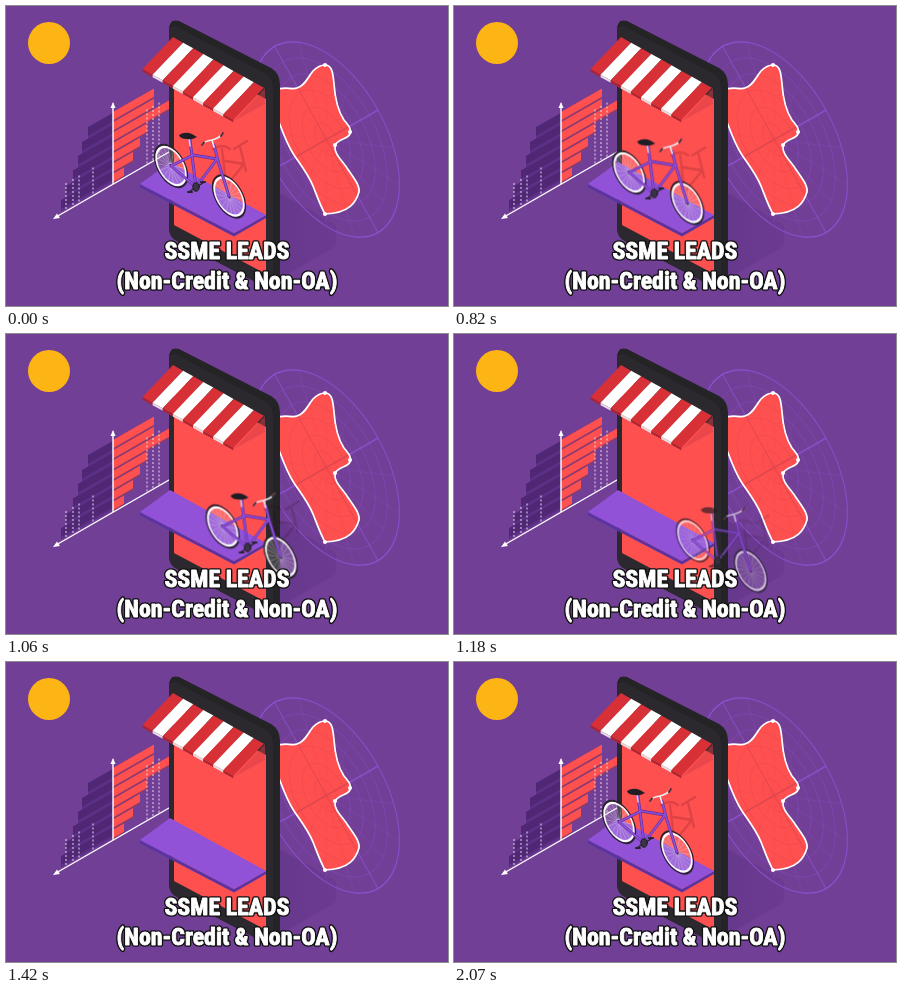
An HTML page for the animation above (4.9 s loop, 442 by 300 pixels).

```html
<!DOCTYPE html>
<html lang="en">
<head>
<meta charset="utf-8">
<title>SSME LEADS</title>
<style>
html, body { margin: 0; width: 100%; height: 100%; overflow: hidden; background: #723f97; }
svg { display: block; width: 100vw; height: 100vh; }
.line { fill: none; stroke-linecap: round; stroke-linejoin: round; }
.caption {
  font-family: "Roboto Condensed", "Open Sans Condensed", "Noto Sans", sans-serif;
  font-size: 25px; font-weight: 900; font-stretch: extra-condensed;
  text-anchor: middle; stroke-linejoin: round;
}
#ride { animation: ride 4900ms linear infinite; }
#bike { animation: fade 4900ms linear infinite; }
@keyframes ride {
  0% { transform: translate(0, 0); }
  13.673% { transform: translate(0, 0); animation-timing-function: cubic-bezier(.333, 0, .667, 1); }
  28.98%, 33% { transform: translate(97px, 61px); }
  33.01%, 100% { transform: translate(0, 0); }
}
@keyframes fade {
  0% { opacity: 1; }
  22.245% { opacity: 1; animation-timing-function: steps(12, start); }
  29.592% { opacity: 0; }
  38.571% { opacity: 0; animation-timing-function: steps(7, start); }
  42.857%, 100% { opacity: 1; }
}
</style>
</head>
<body>
<svg viewBox="0 0 442 300" preserveAspectRatio="none">
  <defs>
    <path id="blob" d="M319 59C326 59 327 67 328 78C329 92 332 105 338 114C342 119 346 123 344 128C341 134 330 133 329 140C328 148 336 154 341 162C347 171 354 179 353 186C350 196 344 207 319 208C314 199 311 190 307 180C302 168 294 158 288 149C280 137 276 124 270 108V84C278 80 286 84 291 82C299 80 302 71 307 65C311 61 315 59 319 59Z"/>
    <clipPath id="inBlob"><use href="#blob"/></clipPath>
    <linearGradient id="shade">
      <stop stop-color="#66388c"/><stop offset="1" stop-color="#6c3b91"/>
    </linearGradient>
    <path id="frame" d="M184 134L190 181L165 160L187 149L211 153L190 181M208 139L212 155L223 190"/>
    <g id="text">
      <text class="caption" x="221" y="252.5">SSME LEADS</text>
      <text class="caption" x="221" y="283">(Non-Credit &amp; Non-OA)</text>
    </g>
  </defs>

  <rect width="442" height="300" fill="#723f97"/>
  <circle cx="43" cy="37" r="21" fill="#fdb515"/>

  <g id="chart"></g>

  <path d="M272 186L330 219V240L272 274Z" fill="url(#shade)"/>
  <g class="line" stroke="#8c50cf"><g id="rings"></g></g>
  <use href="#blob" fill="#ff5050"/>
  <g clip-path="url(#inBlob)" class="line" stroke="#c23d50" opacity=".55"><use href="#rings"/></g>
  <use href="#blob" class="line" stroke="#fff" stroke-width="1.7"/>
  <g fill="#fff">
    <circle cx="319" cy="59" r="2"/><circle cx="344" cy="126" r="2"/>
    <circle cx="329" cy="139" r="2"/><circle cx="319" cy="208" r="2"/>
  </g>

  <path d="M163 24Q163 12 173 15L265 62Q274 67 274 79V272Q274 285 262 282L171 235Q163 231 163 222Z" fill="#242326"/>
  <path d="M163 28Q163 18 171 21L258 67Q267 72 267 83V274Q267 284 259 281L171 235Q163 231 163 222Z" fill="#2b292d"/>
  <path d="M168 44L260 93V268L168 219Z" fill="#ff5050"/>
  <path d="M228 115L259 82V98Z" fill="#d83f45" opacity=".5"/>
  <g id="awning"></g>

  <path d="M134 178L228 227L260 209V212L228 230.5L134 181.5Z" fill="#5c34a2"/>
  <path d="M164 156L260 209L228 227L134 178Z" fill="#9152d8"/>

  <g id="ride"><g id="bike" class="line">
    <g stroke="#3a0712" opacity=".17" stroke-width="2.3">
      <path d="M207 143Q216 137 224 143M216 143L219 169M219 155L238 158L220 180M234 141L240 165M228 143L241 135"/>
    </g>
    <g id="wheels"></g>
    <use href="#frame" stroke="#5d2c9c" stroke-width="2.9"/>
    <use href="#frame" stroke="#8d4fd8" stroke-width="1.7"/>
    <path d="M184 185L197 177" stroke="#28232c" stroke-width="1.3"/>
    <ellipse cx="190" cy="181" rx="3.2" ry="4.2" fill="#3a3342" stroke="#211d25"/>
    <path d="M182 186H186M195 176H199" stroke="#28232c" stroke-width="2"/>
    <path d="M184 140L183 132" stroke="#d8d4dd" stroke-width="1.5"/>
    <path d="M173 129Q179 125 186 128L191 131Q186 134 181 133Q174 133 173 129Z" fill="#211d25"/>
    <path d="M208 141L206 134M196 139Q198 135 206 134Q214 132 217 127" stroke="#eeeaf1" stroke-width="1.6"/>
    <path d="M196 139L198 136.5M215 130L217 127" stroke="#4a2a35" stroke-width="2"/>
  </g></g>

  <use href="#text" fill="#111" stroke="#111" stroke-width="3.6"/>
  <use href="#text" fill="#fff" stroke="#fff" stroke-width=".9"/>
</svg>
<script>
const add = (parent, tag, attrs) => {
  const node = document.createElementNS('http://www.w3.org/2000/svg', tag);
  for (const key in attrs) node.setAttribute(key, attrs[key]);
  return (typeof parent === 'string' ? document.getElementById(parent) : parent).appendChild(node);
};
const SLOPE = .574;
const baseY = x => 178 - (x - 107) * SLOPE;

// Bar chart: each bar runs from the upright axis along the slanted base.
const bar = (from, to, y, height, fill) => {
  const a = y - (from - 107) * SLOPE, b = y - (to - 107) * SLOPE;
  add('chart', 'path', { d: `M${from} ${a}L${to} ${b}V${b + height}L${from} ${a + height}Z`, fill });
};
const leftEnds = [82, 76, 72, 67, 60, 55];
const rightEnds = [148, 148, 163, 141, 134, 127, 118];
leftEnds.forEach((x, i) => {
  bar(x, 107, 107 + i * 11.5, 11.5, '#5d3088');
  bar(x, 107, 107 + i * 11.5, 8.5, '#4f2775');
});
rightEnds.forEach((x, i) => {
  bar(107, x, 106 + i * 10.3, 10.3, '#8d3a6c');
  bar(107, x, 106 + i * 10.3, 8.3, '#ff5050');
});
const dots = (x, top) =>
  add('chart', 'path', { d: `M${x} ${top}V${baseY(x)}`, stroke: '#e6dced', 'stroke-dasharray': '2 2' });
for (const x of [60, 67, 73, 87]) dots(x, baseY(x) - 28);
for (const x of [141, 147, 153]) dots(x, baseY(x) - 55);
add('chart', 'path', { d: 'M107 178V98M50 211L163 146', class: 'line', stroke: '#fff', 'stroke-width': 1.4 });
add('chart', 'path', { d: 'M107 96L104.5 102H109.5ZM47 213L51 207.5L54 212Z', fill: '#fff' });

// Radar grid.
const grid = add('rings', 'g', { transform: 'matrix(.86 .53 0 1.02 320.3 133.5)' });
[85, 71, 57, 43, 28, 14].forEach((r, i) =>
  add(grid, 'circle', { r, 'stroke-width': i ? .6 : 1.1, opacity: i ? .6 : 1 }));
for (let angle = 0; angle < 180; angle += 22.5) {
  const main = angle % 90 === 45;
  add(grid, 'path', { d: 'M-85 0H85', transform: `rotate(${angle})`, 'stroke-width': main ? 1.2 : .5, opacity: main ? 1 : .4 });
}

// Awning stripes.
for (let i = 0; i < 9; i++) {
  const edge = (x, y, k) => `${x + k * 10.1} ${y + k * 5.65}`;
  const fill = i % 2 ? '#fff' : '#d73036';
  add('awning', 'path', { d: `M${edge(167, 31, i)}L${edge(167, 31, i + 1)}L${edge(136.5, 63, i + 1)}L${edge(136.5, 63, i)}Z`, fill });
  add('awning', 'path', { d: `M${edge(136.5, 63, i)}L${edge(136.5, 63, i + 1)}v2.5l-10.1 -5.65Z`, fill: i % 2 ? '#e4d9de' : '#aa2530' });
}

for (const [x, y] of [[165, 160], [223, 190.5]]) {
  const wheel = add('wheels', 'g', { transform: `matrix(.866 .5 0 1 ${x} ${y})` });
  add(wheel, 'circle', { r: 16, fill: '#e5dbe8', opacity: .18 });
  for (let angle = 0; angle < 180; angle += 20)
    add(wheel, 'path', { d: 'M-16 0H16', transform: `rotate(${angle})`, stroke: '#e5dbe8', 'stroke-width': .4, opacity: .7 });
  add(wheel, 'circle', { r: 19, stroke: '#29222d', 'stroke-width': 1.7 });
  add(wheel, 'circle', { r: 17, stroke: '#fff', 'stroke-width': 2 });
  add(wheel, 'circle', { r: 1.8, fill: '#29222d' });
}

// Pick one type size that keeps the longer caption line inside its space.
const pen = document.createElement('canvas').getContext('2d');
const captions = [...document.querySelectorAll('.caption')];
pen.font = `900 25px ${getComputedStyle(captions[1]).fontFamily}`;
pen.fontStretch = 'extra-condensed';
const size = Math.min(26, 25 * 221 / pen.measureText(captions[1].textContent).width);
captions.forEach(line => { line.style.fontSize = `${size}px`; });
</script>
</body>
</html>
```
